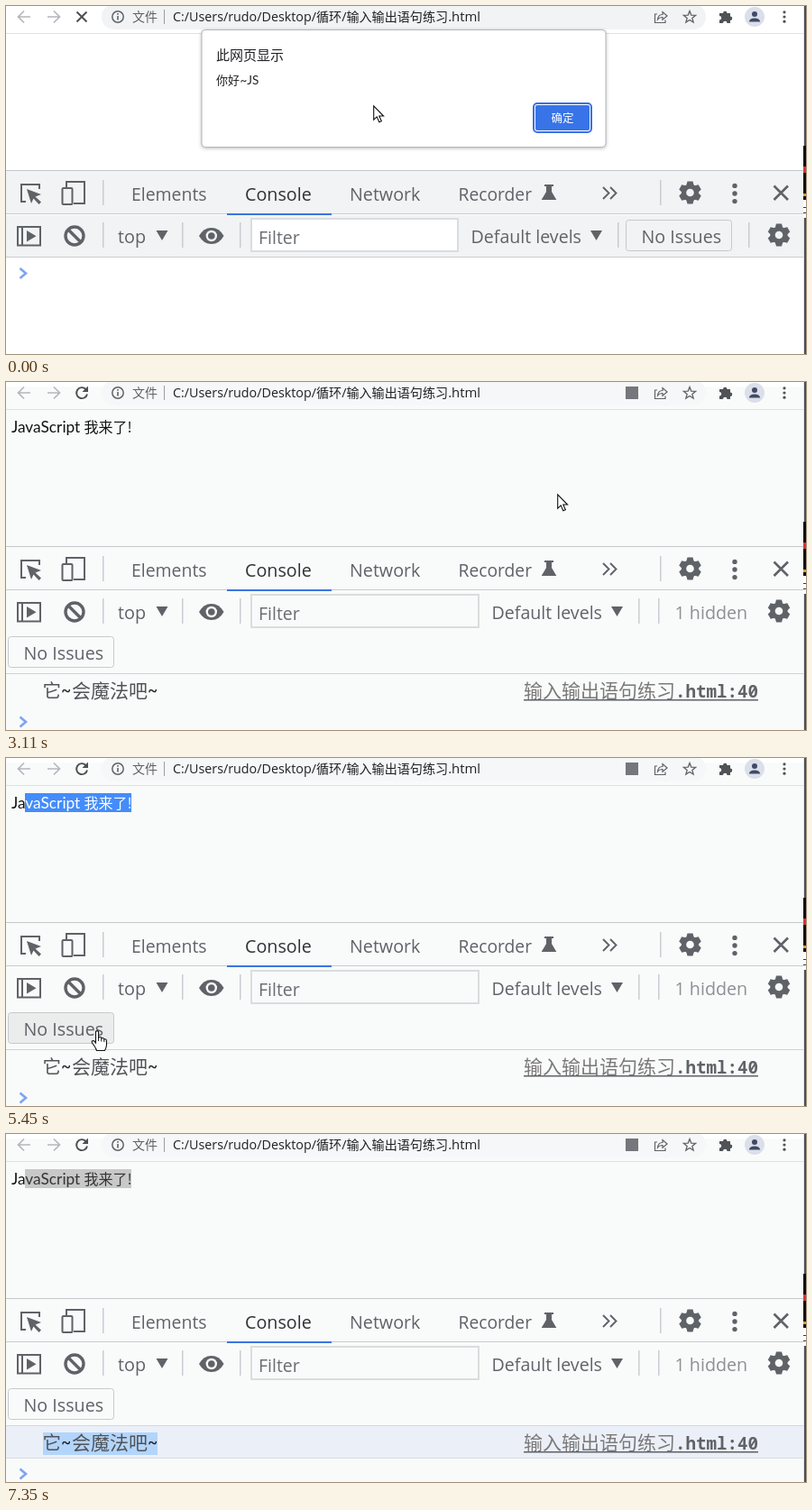
Animation of 887 by 386 pixels, one loop 8000 ms. Source, as an HTML page with a canvas:

```html
<!DOCTYPE html>
<html lang="zh">
<head>
<meta charset="utf-8">
<style>
html, body { margin: 0; width: 100%; height: 100%; overflow: hidden; background: #fff; }
canvas { display: block; width: 887px; height: 386px; }
</style>
</head>
<body>
<canvas id="stage" width="887" height="386"></canvas>
<script>
const g = document.getElementById('stage').getContext('2d');
const LOOP = 8000;
const CJK = '"Noto Sans CJK SC", "Noto Sans CJK", "Noto Sans CJK JP", sans-serif';
const UI = '"Open Sans", "Noto Sans", ' + CJK;
const LATO = 'Lato, ' + CJK;
const MONO = '"Noto Sans Mono", "DejaVu Sans Mono", monospace';
const INK = '#5f6368';
const LINE = '#c9cdd1';

// Pointer stops: time, x, y, shape
const POINTER = [
  [0, 407, 110, 'arrow'], [150, 420, 104, 'arrow'], [270, 465, 88, 'arrow'],
  [390, 520, 73, 'arrow'], [510, 570, 68, 'arrow'], [630, 615, 74, 'arrow'],
  [750, 648, 88, 'arrow'], [870, 668, 106, 'arrow'], [990, 674, 131, 'arrow'],
  [1110, 648, 154, 'arrow'], [1260, 622, 139, 'arrow'], [1380, 611, 127, 'arrow'],
  [1650, 611, 124, 'arrow'], [3600, 202, 70, 'arrow'], [3750, 96, 69, 'arrow'],
  [3870, 48, 62, 'arrow'], [3990, 31, 42, 'beam'], [4110, 29, 51, 'beam'],
  [4260, 28, 51, 'beam'], [4410, 98, 54, 'beam'], [4530, 161, 58, 'arrow'],
  [4780, 200, 66, 'arrow'], [4900, 231, 70, 'arrow'], [5150, 221, 70, 'arrow'],
  [5300, 112, 266, 'arrow'], [5450, 101, 302, 'hand'], [5570, 84, 309, 'hand'],
  [5690, 62, 330, 'arrow'], [5810, 54, 341, 'arrow'], [5960, 53, 342, 'arrow'],
  [6200, 42, 344, 'beam'], [6320, 105, 342, 'beam'], [6440, 185, 336, 'arrow'],
  [6730, 337, 346, 'arrow'], [6870, 410, 352, 'arrow'], [6990, 510, 354, 'arrow'],
  [7110, 640, 349, 'hand'], [7230, 790, 344, 'hand'], [7350, 0, 0, 'none']
];

function rect(x, y, w, h, color) {
  g.fillStyle = color;
  g.fillRect(x, y, w, h);
}

function box(x, y, w, h, r, fill, stroke, lw = 1) {
  g.beginPath();
  g.roundRect(x, y, w, h, r);
  if (fill) { g.fillStyle = fill; g.fill(); }
  if (stroke) { g.strokeStyle = stroke; g.lineWidth = lw; g.stroke(); }
}

function text(s, x, y, size, color, family = UI, weight = 400) {
  g.font = `${weight} ${size}px ${family}`;
  g.fillStyle = color;
  g.fillText(s, x, y);
  return x + g.measureText(s).width;
}

function stroke(d, color, lw) {
  g.strokeStyle = color;
  g.lineWidth = lw;
  g.stroke(new Path2D(d));
}

function fill(d, color) {
  g.fillStyle = color;
  g.fill(new Path2D(d));
}

function dot(x, y, r, color) {
  g.beginPath();
  g.arc(x, y, r, 0, 7);
  g.fillStyle = color;
  g.fill();
}

function ring(x, y, r, color, lw) {
  g.beginPath();
  g.arc(x, y, r, 0, 7);
  g.strokeStyle = color;
  g.lineWidth = lw;
  g.stroke();
}

function dots(x, y, gap, r, color) {
  for (let i = -1; i < 2; i++) dot(x, y + i * gap, r, color);
}

function gear(x, y, bg) {
  for (let i = 0; i < 6; i++) {
    g.save();
    g.translate(x, y);
    g.rotate(i * Math.PI / 3);
    fill('M-4.5 -7 L-3 -12.4 H3 L4.5 -7Z', INK);
    g.restore();
  }
  dot(x, y, 9.6, INK);
  dot(x, y, 4.3, bg);
}

const down = x => fill(`M${x} 249 h13 l-6.5 11z`, INK);
const divider = (x, y) => rect(x, y, 1.5, 28, LINE);

function clipped(x, y, w, h, draw) {
  g.save();
  g.beginPath();
  g.rect(x, y, w, h);
  g.clip();
  draw();
  g.restore();
}

function toolbar(loaded, bg) {
  rect(0, 0, 884, 30, loaded ? bg : '#fff');
  if (loaded) rect(0, 0, 884, 5, '#fff');
  box(106, -2, 670, 28, 14, loaded ? '#f5f7f8' : '#f1f3f4');
  rect(0, 30, 884, 1, '#dfe1e4');

  stroke('M27 12 H14 M20 5.5 L13.5 12 L20 18.5', '#b4b7bb', 1.7);
  stroke('M46 12 H59 M53 5.5 L59.5 12 L53 18.5', '#b4b7bb', 1.7);
  if (loaded) {
    stroke('M88.5 8 A6 6 0 1 0 90 13.5', '#4b4e52', 1.9);
    fill('M91 4.5 V11 H84.5Z', '#4b4e52');
    rect(687, 5, 14, 14, '#74777c');
  } else {
    stroke('M78.5 6.5 L89.5 17.5 M89.5 6.5 L78.5 17.5', '#4b4e52', 1.9);
  }

  ring(124, 12, 6.2, INK, 1.5);
  rect(123.2, 11, 1.6, 4.5, INK);
  rect(123.2, 8, 1.6, 1.7, INK);
  text('文件', 140, 17, 14, INK, CJK);
  rect(175, 4, 1, 16, '#9a9da1');
  let x = text('C:/Users/rudo/Desktop/', 185, 17, 14.3, '#202124');
  x = text('循环', x, 17, 14.1, '#202124', CJK);
  x = text('/', x, 17, 14.3, '#202124');
  x = text('输入输出语句练习', x, 17, 14.1, '#202124', CJK);
  text('.html', x, 17, 14.9, '#202124');

  stroke('M722 9 H719.5 V18.5 H731 V15.5 M722.5 15 Q723 9.5 728 9.5 V6.5 L733 11 L728 15.3 V12.5 Q724.5 12.3 722.5 15Z', INK, 1.2);
  g.beginPath();
  for (let i = 0; i < 10; i++) {
    const a = i * Math.PI / 5 - Math.PI / 2, r = i % 2 ? 3 : 7;
    g.lineTo(758 + r * Math.cos(a), 12.5 + r * Math.sin(a));
  }
  g.closePath();
  g.strokeStyle = INK;
  g.lineWidth = 1.3;
  g.stroke();

  fill('M791 8 H795 A2.2 2.2 0 1 1 799.5 8 H803 V11.5 A2.2 2.2 0 1 1 803 16 V19 H799.5 A2.2 2.2 0 0 0 795 19 H791 V15.5 A2.2 2.2 0 0 0 791 11Z', '#4f5256');
  dot(830, 12, 11, '#dadfea');
  dot(830, 9, 3, '#414a66');
  fill('M823.8 17.5 Q824.5 13.4 830 13.4 Q835.5 13.4 836.2 17.5Z', '#414a66');
  dots(863, 12, 5.2, 1.6, '#4f5256');
}

function tabs(bg) {
  rect(0, 183, 884, 48, bg);
  rect(0, 182, 884, 1, '#c4c8cc');
  stroke('M22 217 H17 V198 H37 V203', INK, 2);
  fill('M23 203 L39 209 L32.5 211.5 L39 217.5 L36.5 220 L30.5 213.5 L28 219Z', INK);
  stroke('M67 201 V195 H87 V219 H75', INK, 2);
  box(62.5, 202, 11, 18, 1, bg, INK, 2);
  divider(107, 193);
  text('Elements', 139, 216, 19.4, INK);
  text('Console', 265, 216, 19.7, '#303236');
  text('Network', 381, 216, 19.7, INK);
  text('Recorder', 501.5, 216, 19.3, INK);
  fill('M597 198 H607 V200 H605 V206 L610.3 215 H593.7 L599 206 V200 H597Z', INK);
  stroke('M662 201 L668.5 207.5 L662 214 M670 201 L676.5 207.5 L670 214', INK, 1.9);
  divider(725, 193);
  gear(758.5, 207, bg);
  dots(808, 208, 8.6, 2.7, INK);
  stroke('M851.5 199.5 L867 215 M867 199.5 L851.5 215', INK, 2.6);
  rect(0, 230, 884, 1, LINE);
  rect(245, 230, 116, 2, '#3b74e0');
}

function filterBar(loaded, bg) {
  rect(0, 232, 884, loaded ? 91 : 46, bg);
  box(13, 245, 25, 20.5, 0, null, INK, 2);
  rect(17, 245, 2, 20, INK);
  fill('M23 249 L33.5 255.2 L23 261.5Z', INK);
  ring(76, 255, 10, INK, 3.4);
  stroke('M69 248 L83 262', INK, 3.4);
  divider(107, 240);
  text('top', 124, 263, 19.8, INK);
  down(166.5);
  divider(195, 240);
  fill('M214 255 Q219 246 227.8 246 Q236.5 246 241.5 255 Q236.5 264 227.8 264 Q219 264 214 255Z', INK);
  dot(227.8, 255, 6.2, bg);
  dot(227.8, 255, 3.8, INK);
  divider(259, 240);

  const shift = loaded ? 23 : 0;
  box(272, 236, 229 + shift, 36, 0, loaded ? bg : '#fff', '#d9dddf', 2);
  text('Filter', 280, 264, 19.5, '#6a6d71');
  text('Default levels', 515.5 + shift, 263, 19.6, INK);
  down(648 + shift);
  if (loaded) {
    divider(701, 240);
    divider(723, 240);
    text('1 hidden', 741.5, 263, 19.7, '#8d9094');
    rect(0, 323, 884, 1, '#cfd2d5');
  } else {
    divider(678, 240);
    divider(823, 240);
    rect(0, 278, 884, 1, LINE);
  }
  gear(857, 254, bg);
}

function issues(x, y, face) {
  box(x + .5, y + .5, 117, 34, 3, face, '#c6cacd');
  text('No Issues', x + 17.5, y + 26, 19.7, INK);
}

function prompt(y) {
  stroke(`M15.5 ${y - 5.5} L22 ${y} L15.5 ${y + 5.5}`, '#7ea3f4', 2.6);
}

function dialog(t) {
  g.save();
  g.shadowColor = 'rgba(0,0,0,.32)';
  g.shadowBlur = 4;
  g.shadowOffsetY = 1;
  box(217, 26.5, 448, 130, 4, '#fff');
  g.restore();
  box(217, 26.5, 448, 130, 4, '#fff', '#b5b7ba');
  text('此网页显示', 233, 60, 15, '#202124', CJK);
  text('你好', 233, 87, 13, '#202124', CJK);
  text('~JS', 259.5, 87, 13.5, '#202124', LATO);
  box(585, 108, 64, 32, 4, '#fff', '#3a72e2', 2);
  box(587, 110, 60, 28, 2, t < 1260 ? '#3874e8' : '#4e81e2');
  if (t >= 2990) clipped(587, 110, 60, 28, () => dot(612, 124, 29, '#618bdb'));
  text('确定', 604.5, 129, 12.5, '#fff', CJK);
}

function greeting(t) {
  const draw = color => {
    text('JavaScript', 6, 56, 17.3, color, LATO);
    text('我来了!', 86.5, 56, 16, color, CJK);
  };
  draw('#111');
  const end = t < 4410 ? 0 : t < 4530 ? 98 : 139;
  if (!end) return;
  const active = t < 5960;
  clipped(21, 39, end - 21, 21, () => {
    rect(21, 39, 118, 21, active ? '#448cfa' : '#c8c8c8');
    draw(active ? '#fff' : '#333');
  });
}

function logRow(t) {
  if (t >= 5960) {
    rect(0, 324, 884, 35, '#ebf0f8');
    rect(0, 323, 884, 1, '#c9d9f0');
    rect(0, 359, 884, 1, '#d9dde2');
  }
  const end = t < 6320 ? 0 : t < 6440 ? 105 : 168;
  if (end) rect(41, 331, end - 41, 25, '#b3d5fb');
  const ink = '#505256', link = '#7b7878';
  text('它', 40.5, 350, 20.6, ink, CJK, 300);
  text('~', 61, 350, 19, '#222', MONO, 700);
  text('会魔法吧', 73, 350, 21, ink, CJK, 300);
  text('~', 157, 350, 19, '#222', MONO, 700);
  text('输入输出语句练习', 574, 350, 21, link, CJK, 300);
  text('.html:40', 742, 350, 19.2, INK, MONO, 600);
  rect(574, 352, 260, 1.5, INK);
}

function rightEdge() {
  rect(884, 0, 1, 386, '#dde1e8');
  rect(885, 0, 2, 386, '#4a4e57');
  rect(884, 155, 3, 60, '#0c0c0e');
  rect(884, 178, 3, 7, '#d8342c');
  rect(884, 208, 3, 3, '#e3a126');
  rect(884, 215, 3, 20, '#fff');
  rect(884, 223, 3, 1, '#333');
  rect(884, 229, 3, 1, '#333');
}

function pointer(t) {
  const [, x, y, shape] = POINTER.filter(p => p[0] <= t).pop();
  g.save();
  g.translate(x, y);
  if (shape === 'arrow') {
    const d = 'M.7 .8 V16.2 L4.2 12.9 L6.8 18.8 L9.3 17.7 L6.8 12 H11.6Z';
    fill(d, '#fff');
    stroke(d, '#111', 1.1);
  } else if (shape === 'beam') {
    stroke('M-3.5 -7.5 H-1 L0 -6.5 L1 -7.5 H3.5 M0 -6.5 V6.5 M-3.5 7.5 H-1 L0 6.5 L1 7.5 H3.5', '#111', 1);
  } else if (shape === 'hand') {
    const d = 'M-1.5 14 V2 Q-1.5 .6 0 .6 Q1.6 .6 1.6 2 V8 Q4.5 6.5 4.8 9 Q7.5 7.8 7.8 10 Q10.5 9.2 10.5 12 V16 Q10.5 19 8.5 22.5 H-.5 Q-1.5 19 -5.5 14 Q-6.5 11.5 -4 11.5 Q-3 11.8 -1.5 14Z';
    fill(d, '#fff');
    stroke(d, '#111', 1.1);
    stroke('M1.6 8 V12 M4.8 9 V12.5 M7.8 10 V13', '#111', 1);
  }
  g.restore();
}

function draw(t) {
  const loaded = t >= 3110;
  const pale = '#f9fbfb';
  const bar = loaded ? pale : '#f1f3f4';
  rect(0, 0, 887, 386, loaded ? pale : '#fff');
  toolbar(loaded, pale);
  tabs(bar);
  filterBar(loaded, bar);
  if (loaded) {
    issues(2, 282, t >= 5450 && t < 5690 ? '#ebecec' : null);
    greeting(t);
    logRow(t);
    prompt(377);
  } else {
    issues(687, 237, null);
    prompt(296.5);
    dialog(t);
  }
  rightEdge();
  pointer(t);
}

const start = performance.now();
function tick() {
  draw((performance.now() - start) % LOOP);
  requestAnimationFrame(tick);
}
tick();
</script>
</body>
</html>
```
